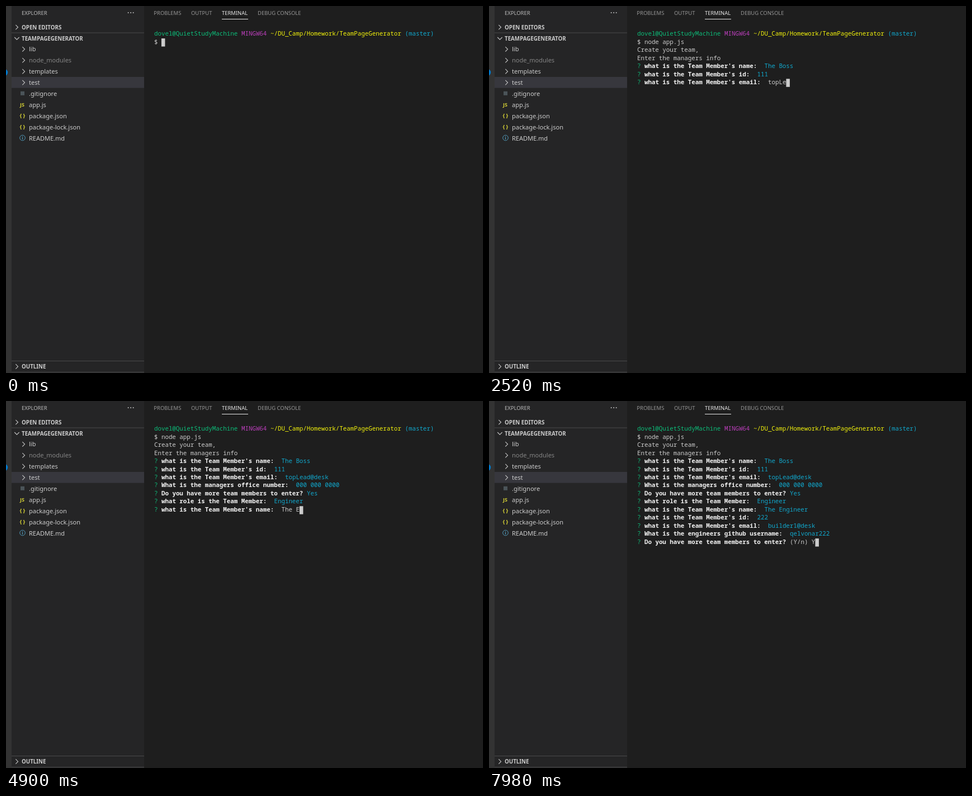
An HTML page for the animation above (8000 ms loop, 853x657 px).

```html
<!DOCTYPE html>
<html lang="en">
<head>
<meta charset="utf-8">
<title>Team page generator</title>
<style>
  html, body { margin: 0; width: 100%; height: 100%; overflow: hidden; background: #1e1e1e; }
  svg { display: block; width: 100%; height: 100%; }
  text { white-space: pre; font-family: "Noto Sans", "Open Sans", sans-serif; }
  .mono text { font-family: "Noto Sans Mono", "DejaVu Sans Mono", monospace; font-size: 10.833px; }
  .file { font-size: 11px; }
  .tab { font-size: 9.45px; }
  .head { font-size: 9.75px; font-weight: 700; fill: #ccc; }
  .chevron { fill: none; stroke: #c5c5c5; stroke-width: 1.1; }
</style>
</head>
<body>
<svg viewBox="0 0 853 657">
  <rect width="853" height="657" fill="#1e1e1e"/>
  <rect width="10" height="657" fill="#333"/>
  <rect x="10" width="237" height="657" fill="#252526"/>
  <circle cx="-3" cy="119" r="6.2" fill="#007acc"/>
  <rect x="10" y="127" width="237" height="19.7" fill="#37373d"/>
  <g fill="#4a4a4b">
    <rect x="10" y="47.5" width="237" height="1"/>
    <rect x="10" y="635" width="237" height="1"/>
    <rect x="10" y="655" width="237" height="1"/>
  </g>
  <g fill="#c5c5c5">
    <circle cx="218.6" cy="12" r="1"/>
    <circle cx="223.1" cy="12" r="1"/>
    <circle cx="227.6" cy="12" r="1"/>
  </g>
  <rect x="386" y="23" width="47" height="1" fill="#e7e7e7"/>
  <g id="side"></g>
  <g id="term" class="mono"></g>
</svg>
<script>
const NS = 'http://www.w3.org/2000/svg';
const side = document.getElementById('side');
const term = document.getElementById('term');

function add(parent, tag, attrs, content) {
  const el = document.createElementNS(NS, tag);
  for (const key in attrs) el.setAttribute(key, attrs[key]);
  if (content !== undefined) el.textContent = content;
  parent.appendChild(el);
  return el;
}

// Static panels
const label = (x, y, content, attrs) => add(side, 'text', { x, y, ...attrs }, content);
const chevron = (x, y) => add(side, 'path', { class: 'chevron', d: `M${x} ${y - 4.2}l4.2 4.2l-4.2 4.2` });

function drawPanels() {
  label(28, 16, 'EXPLORER', { class: 'tab', fill: '#bbb' });
  [['PROBLEMS', 264.3], ['OUTPUT', 331], ['TERMINAL', 386], ['DEBUG CONSOLE', 450]].forEach(([name, x]) =>
    label(x, 16, name, { class: 'tab', fill: name === 'TERMINAL' ? '#e7e7e7' : '#969696' }));

  [['OPEN EDITORS', 41.6], ['TEAMPAGEGENERATOR', 61.8], ['OUTLINE', 648.9]].forEach(([name, y]) =>
    label(28, y, name, { class: 'head' }));
  chevron(17.3, 38);
  chevron(17.3, 645.4);
  add(side, 'path', { class: 'chevron', d: 'M15.2 56l4.2 4.2l4.2-4.2' });

  const files = ['lib', 'node_modules', 'templates', 'test', '.gitignore', 'app.js',
    'package.json', 'package-lock.json', 'README.md'];
  files.forEach((name, i) => {
    const y = 77.3 + 19.93 * i;
    label(41, y + 3.9, name, { class: 'file', fill: name === 'node_modules' ? '#858585' : '#ccc' });
    if (i < 4) chevron(29.3, y);
    else drawIcon(name, y - 0.7);
  });
}

function drawIcon(name, y) {
  const glyph = (x, content, size) =>
    label(x, y + 3.3, content, { fill: '#d4d035', 'font-size': size, 'font-weight': 700 });
  if (name === '.gitignore') {
    add(side, 'rect', { x: 26, y: y - 3.5, width: 7, height: 7, fill: '#4b5459' });
  } else if (name.endsWith('.js')) {
    glyph(25, 'JS', 9);
  } else if (name.endsWith('.json')) {
    glyph(24.6, '{', 9.5);
    glyph(30.6, '}', 9.5);
  } else {
    add(side, 'circle', { cx: 29.5, cy: y, r: 4.8, fill: 'none', stroke: '#519aba' });
    add(side, 'path', { d: `M29.5 ${y - 2.8}v1.2M29.5 ${y - 0.7}v3.5`, stroke: '#519aba', 'stroke-width': 1.3 });
  }
}

// Terminal session: one key per tick, "~" is a pause
const LOOP = 8000, TICK = 70;
const CELL = 6.5, LINE = 14.465, LEFT = 264.9, TOP = 43.6;
const C = { text: '#ccc', bold: '#f2f2f2', green: '#0dbc79', cyan: '#11a8cd', magenta: '#bc3fbc', yellow: '#f2f20c' };

const COMMAND = 'node app.js';
const INTRO = COMMAND.length + 2;
const MORE = { ask: 'Do you have more team members to enter? ', hint: '(Y/n) ', keys: 'Y', answer: 'Yes' };
const member = (what, keys) => ({ ask: `what is the Team Member's ${what}:  `, keys });

const prompts = [
  member('name', '~~The ~Boss'),
  member('id', '111'),
  member('email', 'top~Lead~~@desk'),
  { ask: 'What is the managers office number:  ', keys: '~000 000~ 0000' },
  MORE,
  { ask: 'what role is the Team Member:  ', hint: '(Use arrow keys)', keys: '', answer: 'Engineer', options: ['Engineer', 'Intern'] },
  member('name', 'The ~Engineer'),
  member('id', '~222'),
  member('email', '~builder1~@desk~'),
  { ask: 'What is the engineers github username:  ', keys: '~qelvonar222' },
  MORE
];

const typed = (keys, n) => keys.slice(0, Math.max(0, n)).replace(/~/g, '');

// Returns rows of [text, colour] runs and whether the cursor shows
function screenAt(tick) {
  const rows = [
    [['dovel@QuietStudyMachine ', C.green], ['MINGW64 ', C.magenta],
      ['~/DU_Camp/Homework/TeamPageGenerator ', C.yellow], ['(master)', C.cyan]],
    [['$ ' + typed(COMMAND, tick), C.text]]
  ];
  if (tick < INTRO - 1) return { rows, cursor: true };
  if (tick < INTRO) return { rows: [...rows, []], cursor: true };
  rows.push([['Create your team,', C.text]], [['Enter the managers info', C.text]]);
  if (tick === INTRO) return { rows: [...rows, []], cursor: true };

  let start = INTRO + 1;
  for (const { ask, hint = '', keys, answer, options } of prompts) {
    const end = start + keys.length + 1;
    const row = [['? ', C.green], [ask, C.bold]];
    rows.push(row);
    if (tick < end) {
      row.push([hint + typed(keys, tick - start), C.text]);
      if (options) options.forEach((name, i) =>
        rows.push([[(i ? '  ' : '> ') + name, i ? C.text : C.cyan]]));
      return { rows, cursor: !options };
    }
    row.push([answer || typed(keys, keys.length), C.cyan]);
    start = end;
  }
  return { rows, cursor: false };
}

function render(tick) {
  const { rows, cursor } = screenAt(tick);
  term.replaceChildren();
  let col = 0;
  rows.forEach((row, i) => {
    col = 0;
    for (const [content, fill] of row) {
      add(term, 'text', {
        x: LEFT + col * CELL, y: TOP + i * LINE + 9.6, fill,
        'font-weight': fill === C.bold ? 700 : 400
      }, content);
      col += content.length;
    }
  });
  if (cursor) add(term, 'rect', {
    x: LEFT + col * CELL, y: TOP + (rows.length - 1) * LINE, width: CELL, height: LINE, fill: '#ccc'
  });
}

let shown = -1;
function frame() {
  const tick = Math.floor(performance.now() % LOOP / TICK);
  if (tick !== shown) render(shown = tick);
  requestAnimationFrame(frame);
}

drawPanels();
frame();
</script>
</body>
</html>
```
